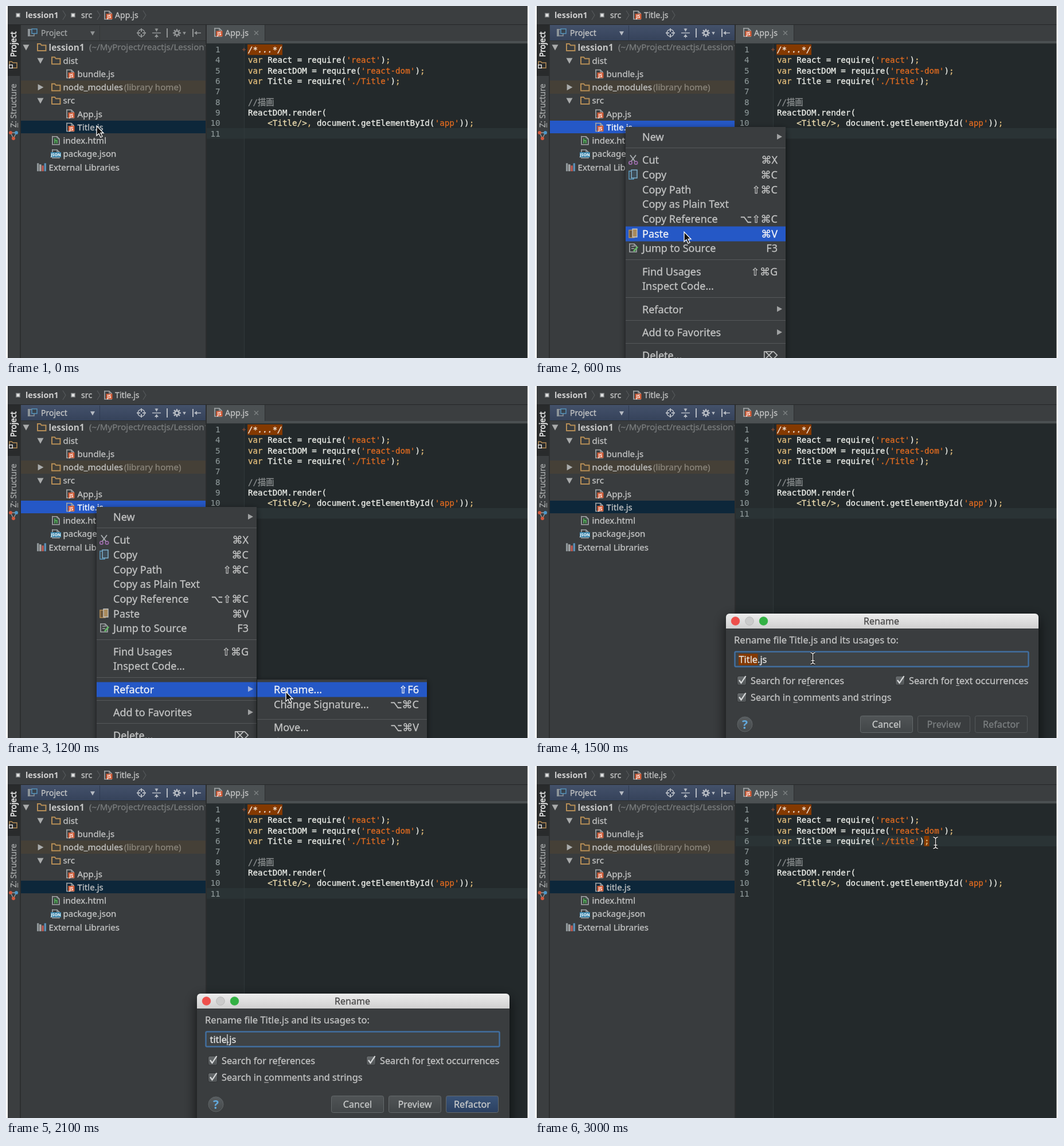
These frames come from a looping animation (912x614 px, 3.3 s). An HTML page with a canvas:

```html
<!DOCTYPE html>
<html>
<head>
<meta charset="utf-8">
<style>
html, body { margin: 0; width: 912px; height: 614px; overflow: hidden; background: #fff }
canvas { display: block }
</style>
</head>
<body>
<canvas id="stage" width="912" height="614"></canvas>
<script>
const g = document.getElementById('stage').getContext('2d');
const UI = '"Noto Sans", "DejaVu Sans", "Noto Sans CJK JP", sans-serif';
const MONO = '"DejaVu Sans Mono", "Noto Sans CJK JP", monospace';
const STEP = 300, STEPS = 11, ADVANCE = 8.57, LINE = 18.3;
const PANEL = '#3a3d3f', TEXT = '#c3c4c4', BLUE = '#2558c6', BROWN = '#843900', TAN = '#b58d56';

function rect(x, y, w, h, color) { g.fillStyle = color; g.fillRect(x, y, w, h); }

function path(color, points, { fill, width = 1.5 } = {}) {
  g.beginPath();
  for (let i = 0; i < points.length; i += 2) g.lineTo(points[i], points[i + 1]);
  if (fill) { g.closePath(); g.fillStyle = fill; g.fill(); }
  if (color) { g.strokeStyle = color; g.lineWidth = width; g.stroke(); }
}

function circle(x, y, r, fill, stroke, width = 1.5) {
  g.beginPath();
  g.arc(x, y, r, 0, 7);
  if (fill) { g.fillStyle = fill; g.fill(); }
  if (stroke) { g.strokeStyle = stroke; g.lineWidth = width; g.stroke(); }
}

function box(x, y, w, h, r, fill, stroke, width = 1) {
  g.beginPath();
  g.roundRect(x, y, w, h, r);
  if (fill) { g.fillStyle = fill; g.fill(); }
  if (stroke) { g.strokeStyle = stroke; g.lineWidth = width; g.stroke(); }
}

function gradient(y, h, top, bottom) {
  const fill = g.createLinearGradient(0, y, 0, y + h);
  fill.addColorStop(0, top);
  fill.addColorStop(1, bottom);
  return fill;
}

// y is the vertical centre of the capitals
function text(s, x, y, color = TEXT, size = 15.1, { style = '', font = UI, align = 'left', weight = .3 } = {}) {
  g.font = `${style} ${size}px ${font}`;
  g.textAlign = align;
  g.fillStyle = g.strokeStyle = color;
  g.lineWidth = weight;
  g.fillText(s, x, y + size * .36);
  if (weight) g.strokeText(s, x, y + size * .36);
  return g.measureText(s).width;
}

// "_" precedes the underlined letter
function mnemonic(label, x, y, size) {
  const at = label.indexOf('_'), plain = label.replace('_', '');
  text(plain, x, y, TEXT, size);
  const left = g.measureText(plain.slice(0, at)).width;
  rect(x + left, y + 8, g.measureText(plain[at]).width, 1, TEXT);
}

function triangle(x, y, r, down, color = '#a9abab') {
  path(null, down ? [x - r, y - r * .8, x + r, y - r * .8, x, y + r]
                  : [x - r * .8, y - r, x + r, y, x - r * .8, y + r], { fill: color });
}

function folder(x, y) {
  path(TAN, [x - 7, y + 6, x - 7, y - 6, x - 2, y - 6, x, y - 3.5, x + 7.5, y - 3.5, x + 7.5, y + 6, x - 7.8, y + 6], { width: 2 });
}

function page(x, y) {
  path('#a4a8aa', [x - 6, y - 7, x + 2, y - 7, x + 6, y - 3, x + 6, y + 7, x - 6, y + 7, x - 6, y - 8], { width: 1.6 });
  path('#a4a8aa', [x + 2, y - 7, x + 2, y - 3, x + 6, y - 3], { width: 1.2 });
}

function jsIcon(x, y) {
  page(x, y);
  rect(x - 3.5, y - 2.5, 11, 9.5, '#d05a35');
  text('JS', x + 2, y + 2.4, '#fff', 8, { style: 'bold', align: 'center', weight: 0 });
}

function htmlIcon(x, y) {
  page(x, y);
  rect(x - 3, y - 4, 6, 9, '#2f5f38');
  path('#62b565', [x - 2, y - 4, x - 2, y + 5, x - 2, y, x + 2, y, x + 2, y + 5]);
}

function jsonIcon(x, y) {
  page(x, y);
  rect(x - 9, y - 3, 18, 9, '#3c87ad');
  text('JSON', x, y + 1.6, '#fff', 7, { style: 'bold', align: 'center', weight: 0 });
}

function libraryIcon(x, y) {
  ['#8f9699', '#a4a8aa', '#c25a52', '#5a8fb5'].forEach((c, i) =>
    rect(x - 8 + i * 4.2, y - 7 + i % 3 * 2, 3.4, 14 - i % 3 * 2, c));
}

function chevron(x) { path('#56595b', [x, 8, x + 5, 16, x, 24], { width: 1.2 }); }

function topBar(file) {
  rect(3, 0, 907, 32, '#3b3e40');
  for (const x of [17, 113]) {
    rect(x, 12, 8, 8, '#777b7d');
    rect(x + 1.5, 13.5, 5, 5, '#e4e4e4');
  }
  text('lession1', 34, 16, '#d0d0d0', 14.3, { style: 'bold', weight: 0 });
  text('src', 131, 16, TEXT, 14.3);
  jsIcon(178, 16);
  text(file, 190, 16, TEXT, 14.2);
  [99, 159, 239].forEach(chevron);
  rect(3, 32, 907, 1, '#252728');
}

function sideBar() {
  rect(3, 33, 22, 581, '#3b3e40');
  rect(3, 33, 22, 89, '#292b2c');
  rect(24, 33, 2, 581, '#2c2e2f');
  g.save();
  g.rotate(-Math.PI / 2);
  text('Project', -89, 13, '#e8e8e8', 13.6, { weight: .6 });
  text('Z: Structure', -212, 13, '#a9abab', 14);
  rect(-212, 20, 8, 1, '#a9abab');
  g.restore();
  path(TAN, [6, 108, 6, 97, 10, 97, 12, 99, 19, 99, 19, 108, 5, 108]);
  rect(5, 102, 7, 7, '#d8d8d8');
  rect(6.5, 103.5, 4, 4, '#222');
  path('#9da2a5', [8, 221, 18, 221, 13, 231, 8, 221], { width: 1.3 });
  circle(8, 221, 3, '#d35a3e');
  circle(18, 221, 3, '#4d97c8');
  circle(13, 231, 3, '#d35a3e');
}

function projectHeader(active) {
  rect(26, 33, 322, 28, active ? gradient(33, 28, '#43516a', '#35425a') : '#3d4042');
  const ink = active ? '#b5bac2' : '#909394';
  rect(26, 60, 322, 1, '#2d2f30');
  rect(163, 34, 1, 26, active ? '#2f3b51' : '#343738');
  box(39, 41, 10, 11, 0, null, '#8d9498', 1.5);
  rect(38, 40, 4, 13, '#8d9498');
  box(45, 40, 9, 8, 0, '#38424d', '#5593bb', 1.5);
  text('Project', 61, 47, active ? TEXT : '#a1a3a4', 14);
  triangle(151, 47.5, 4, true, ink);
  circle(236, 47, 6, null, ink, 1.6);
  path(ink, [236, 39, 236, 45], { width: 2 });
  path(ink, [236, 49, 236, 55], { width: 2 });
  path(ink, [228, 47, 234, 47], { width: 2 });
  path(ink, [238, 47, 244, 47], { width: 2 });
  path(ink, [255, 47, 270, 47]);
  triangle(262.5, 42, 3, true, ink);
  path(null, [259, 54, 266, 54, 262.5, 49], { fill: ink });
  rect(262, 39, 1, 4, ink);
  rect(262, 52, 1, 4, ink);
  rect(280, 39, 2, 16, ink);
  for (let i = 0; i < 8; i++) {
    const c = Math.cos(i * Math.PI / 4), s = Math.sin(i * Math.PI / 4);
    path(ink, [298 + c * 3, 47 + s * 3, 298 + c * 7, 47 + s * 7], { width: 2.4 });
  }
  circle(298, 47, 3.5, null, ink, 2.5);
  triangle(311, 47.5, 2.8, true, ink);
  rect(325, 40, 2, 14, ink);
  path(ink, [340, 47, 330, 47]);
  path(null, [328, 47, 333, 43.5, 333, 50.5], { fill: ink });
}

function tree(file, active) {
  rect(26, 61, 322, 553, '#393c3e');
  rect(26, 130, 322, 23, '#454037');
  rect(26, 200, 322, 22, active ? BLUE : '#0d273a');
  const rows = [
    ['lession1', 54, folder, 'open'], ['dist', 79, folder, 'open'], ['bundle.js', 104, jsIcon],
    ['node_modules', 79, folder, 'closed'], ['src', 79, folder, 'open'], ['App.js', 104, jsIcon],
    [file, 104, jsIcon], ['index.html', 79, htmlIcon], ['package.json', 79, jsonIcon],
    ['External Libraries', 54, libraryIcon]
  ];
  rows.forEach(([name, x, icon, fold], i) => {
    const y = 72 + i * 23.25;
    icon(x + 8, y);
    if (fold) triangle(x - 19, y, 5.5, fold == 'open');
    const bright = active && i == 6;
    text(name, x + 20.5, y, bright ? '#fff' : TEXT, i ? 15.1 : 15.4, { style: i ? '' : 'bold', weight: i ? .3 : 0 });
  });
  g.save();
  g.beginPath();
  g.rect(26, 61, 322, 200);
  g.clip();
  text('(~/MyProject/reactjs/Lession1)', 145, 72, '#797c7d', 15.1);
  text('(library home)', 206, 141.5, '#8b867c', 15.1);
  g.restore();
  rect(348, 33, 2, 581, '#2c2e2f');
}

function codeLine(source, y) {
  let column = 0;
  for (const token of source.match(/\/\/.*|'[^']*'|^var|[;,]|<\w+\/>|[^';,<]+/g) || []) {
    const color = token[0] == "'" ? '#dd6a20' : token.startsWith('//') ? '#8b8f90'
      : /^(var|[;,])$/.test(token) ? '#e2bd7b' : token[0] == '<' ? '#eadbae' : '#eceee9';
    text(token, 422 + column * ADVANCE, y, color, 14.22, { font: MONO });
    column += token.length;
  }
}

function editor(module, caretLine) {
  rect(350, 33, 560, 28, '#3b3e40');
  rect(350, 33, 101, 29, '#4c5153');
  rect(451, 33, 1, 28, '#2d3031');
  rect(350, 61, 560, 5, '#4b5052');
  rect(350, 65, 560, 1, '#303536');
  jsIcon(370, 46);
  text('App.js', 382, 47, TEXT, 14.3);
  path('#7c8081', [433, 43.5, 440, 50.5]);
  path('#7c8081', [440, 43.5, 433, 50.5]);
  rect(350, 66, 560, 548, '#23292b');
  rect(350, 66, 65, 548, '#262c2e');
  rect(350, caretLine == 11 ? 213 : 121.5, 560, 18.5, '#2a3335');
  rect(415, 66, 1, 548, '#30383a');
  rect(421, 67, 61, 18.5, BROWN);
  text('/*...*/', 422, 76, '#f4eadf', 14.22, { style: 'italic', font: MONO });
  rect(412, 75.5, 6, 1, '#a35736');
  rect(414.5, 73, 1, 6, '#a35736');
  if (caretLine == 6) rect(678.5, 122, 9, 18, BROWN);
  const lines = ['', "var React = require('react');", "var ReactDOM = require('react-dom');",
    `var Title = require('./${module}');`, '', '//描画', 'ReactDOM.render(',
    "    <Title/>, document.getElementById('app'));", ''];
  lines.forEach((line, i) => {
    const y = 76 + i * LINE;
    text(i ? i + 3 : 1, 373.5, y, '#8b9697', 14.22, { font: MONO, align: 'right', weight: .15 });
    codeLine(line, y);
  });
}

function menuPanel(x, y, w, separators) {
  g.save();
  g.shadowColor = '#0009';
  g.shadowBlur = 10;
  g.shadowOffsetY = 3;
  rect(x, y, w, 640 - y, PANEL);
  g.restore();
  for (const line of separators) rect(x, line, w, 1, '#55585a');
}

function menuItem(label, y, x, w, keys, selected) {
  if (selected) rect(x, y - 13, w, 26, BLUE);
  const ink = selected ? '#f2f4f8' : TEXT, right = x + w - 14;
  text(label, x + 29, y, ink, 18);
  if (keys == '>') triangle(right + 3, y - 1, 5, false, selected ? '#9fb0d8' : '#a0a2a3');
  else text(keys, right, y, ink, 18, { align: 'right' });
}

function contextMenu(selected) {
  menuPanel(158, 211, 279, [247, 442, 508, 548, 588]);
  const items = [['New', 229, '>'], ['Cut', 269, '⌘X'], ['Copy', 295, '⌘C'], ['Copy Path', 320.5, '⇧⌘C'],
    ['Copy as Plain Text', 346, ''], ['Copy Reference', 371.5, '⌥⇧⌘C'], ['Paste', 397.5, '⌘V'],
    ['Jump to Source', 423, 'F3'], ['Find Usages', 463.5, '⇧⌘G'], ['Inspect Code...', 489, ''],
    ['Refactor', 529.5, '>'], ['Add to Favorites', 570, '>'], ['Delete...', 610, '⌦']];
  for (const [label, y, keys] of items) menuItem(label, y, 158, 279, keys, label == selected);
  path('#a9adb0', [166, 260, 175, 272], { width: 1.8 });
  path('#a9adb0', [176, 260, 167, 272], { width: 1.8 });
  circle(166.5, 273.5, 2.7, null, '#9a6aa8', 1.8);
  circle(176, 273.5, 2.7, null, '#9a6aa8', 1.8);
  box(164, 288, 8, 14, 0, null, '#5b9cc4', 1.5);
  box(168, 286, 10, 14, 0, '#3d4d58', '#7fb0cd', 1.5);
  box(164, 391, 9, 13, 0, '#6d5639', TAN, 1.5);
  box(170, 389, 8, 14, 0, '#a98a5c', '#c5c7c8', 1.3);
  page(171, 422);
  path('#a4a8aa', [168, 419, 173, 419]);
  path('#a4a8aa', [168, 423, 173, 423]);
  path('#62b565', [172, 428, 179, 420], { width: 3 });
}

function refactorMenu(selected) {
  menuPanel(438, 512, 296, [581]);
  const items = [['Rename...', 529.5, '⇧F6'], ['Change Signature...', 555.5, '⌥⌘C'],
    ['Move...', 595.5, '⌥⌘V'], ['Copy...', 621, '']];
  for (const [label, y, keys] of items) menuItem(label, y, 438, 296, keys, label == selected);
}

function checkbox(label, x, y) {
  box(x, y - 8, 16, 16, 3, gradient(y - 8, 16, '#696d6f', '#4f5355'), '#2f3133');
  path('#d8dadb', [x + 3.5, y - 1, x + 7, y + 4, x + 15, y - 8], { width: 2.2 });
  mnemonic(label, x + 23.5, y, 16.3);
}

function button(label, x, enabled, primary) {
  const fill = primary ? gradient(575, 30, '#3a5478', '#2a3f60') : enabled ? gradient(575, 30, '#505456', '#414547') : PANEL;
  box(x + .5, 575.5, 91, 29, 3, fill, enabled ? '#64696b' : '#54585a');
  text(label, x + 46, 590, enabled ? '#c8caca' : '#7b7f80', 16.2, { align: 'center' });
}

function dialog(name, typed) {
  g.save();
  g.shadowColor = '#000b';
  g.shadowBlur = 22;
  g.shadowOffsetY = 8;
  box(333, 397, 545, 240, 6, PANEL);
  g.restore();
  box(333, 397, 545, 26, [6, 6, 0, 0], gradient(397, 26, '#ededed', '#d0d0d0'));
  ['#ee4f4b', '#cbcbcb', '#33b144'].forEach((c, i) => circle(349.5 + i * 24.5, 410, 7.3, c, i == 1 ? '#b2b2b2' : c, .8));
  text('Rename', 604, 410.5, '#484848', 16, { align: 'center' });
  text('Rename file Title.js and its usages to:', 347, 443.5, TEXT, 16.6);
  box(348.5, 463.5, 512, 26, 2, '#3f4345', '#426f9f', 2.5);
  const stem = name.split('.')[0];
  g.font = `16.3px ${UI}`;
  const width = g.measureText(stem).width;
  if (!typed) rect(355, 467, width + 1, 20, BROWN);
  text(name, 355.5, 477.5, '#e4e5e5', 16.3);
  if (typed) rect(356 + width, 468, 1.3, 19, '#e4e5e5');
  checkbox('Search for re_ferences', 352.5, 514);
  checkbox('Search for _text occurrences', 628.5, 514);
  checkbox('Search in _comments and strings', 352.5, 543.5);
  circle(366, 590, 13, gradient(577, 26, '#585d60', '#45494b'), '#606567', 1);
  text('?', 366, 590, '#62a9dc', 21, { style: 'bold', align: 'center', weight: 0 });
  button('Cancel', 567, true);
  button('Preview', 667, typed);
  button('Refactor', 767, typed, typed);
}

function arrow(x, y) {
  path('#fff', [x, y, x, y + 17, x + 4, y + 13.5, x + 7, y + 20, x + 10, y + 18.5, x + 7, y + 12.5, x + 12, y + 12.5, x, y],
    { fill: '#111', width: 1.3 });
}

function beam(x, y) {
  for (const [color, width] of [['#111', 3.4], ['#eee', 1.4]]) {
    path(color, [x - 4, y - 10, x - 1, y - 9, x, y - 7, x, y + 7, x - 1, y + 9, x - 4, y + 10], { width });
    path(color, [x + 4, y - 10, x + 1, y - 9, x, y - 7], { width });
    path(color, [x + 4, y + 10, x + 1, y + 9, x, y + 7], { width });
    path(color, [x - 3, y + 4, x + 3, y + 4], { width });
  }
}

function draw(step) {
  const file = step < 9 ? 'Title.js' : 'title.js';
  const menuOpen = step > 0 && step < 5;
  rect(0, 0, 912, 614, '#fff');
  tree(file, menuOpen);
  topBar(step ? file : 'App.js');
  sideBar();
  projectHeader(step > 0);
  editor(step < 8 ? 'Title' : 'title', step < 10 ? 11 : 6);
  if (menuOpen) contextMenu([, '', 'Paste', 'Refactor', 'Refactor'][step]);
  if (step == 3 || step == 4) refactorMenu(step == 4 ? 'Rename...' : '');
  if (step > 4 && step < 8) dialog(['Title.js', 't.js', 'title.js'][step - 5], step > 5);
  const pointer = [[158, 209], [158, 213], [260, 394], [348, 533], [488, 533]][step];
  if (pointer) arrow(...pointer);
  if (step == 5) beam(484.5, 475);
  if (step == 10) beam(698.5, 134);
  rect(0, 0, 2.5, 614, '#fff');
  rect(909.5, 0, 3, 614, '#fff');
}

function play(now) {
  draw(Math.floor(now / STEP) % STEPS);
  requestAnimationFrame(play);
}
const start = performance.now();
requestAnimationFrame(function tick() {
  draw(Math.floor((performance.now() - start) / STEP) % STEPS);
  requestAnimationFrame(tick);
});
draw(0);
</script>
</body>
</html>
```
